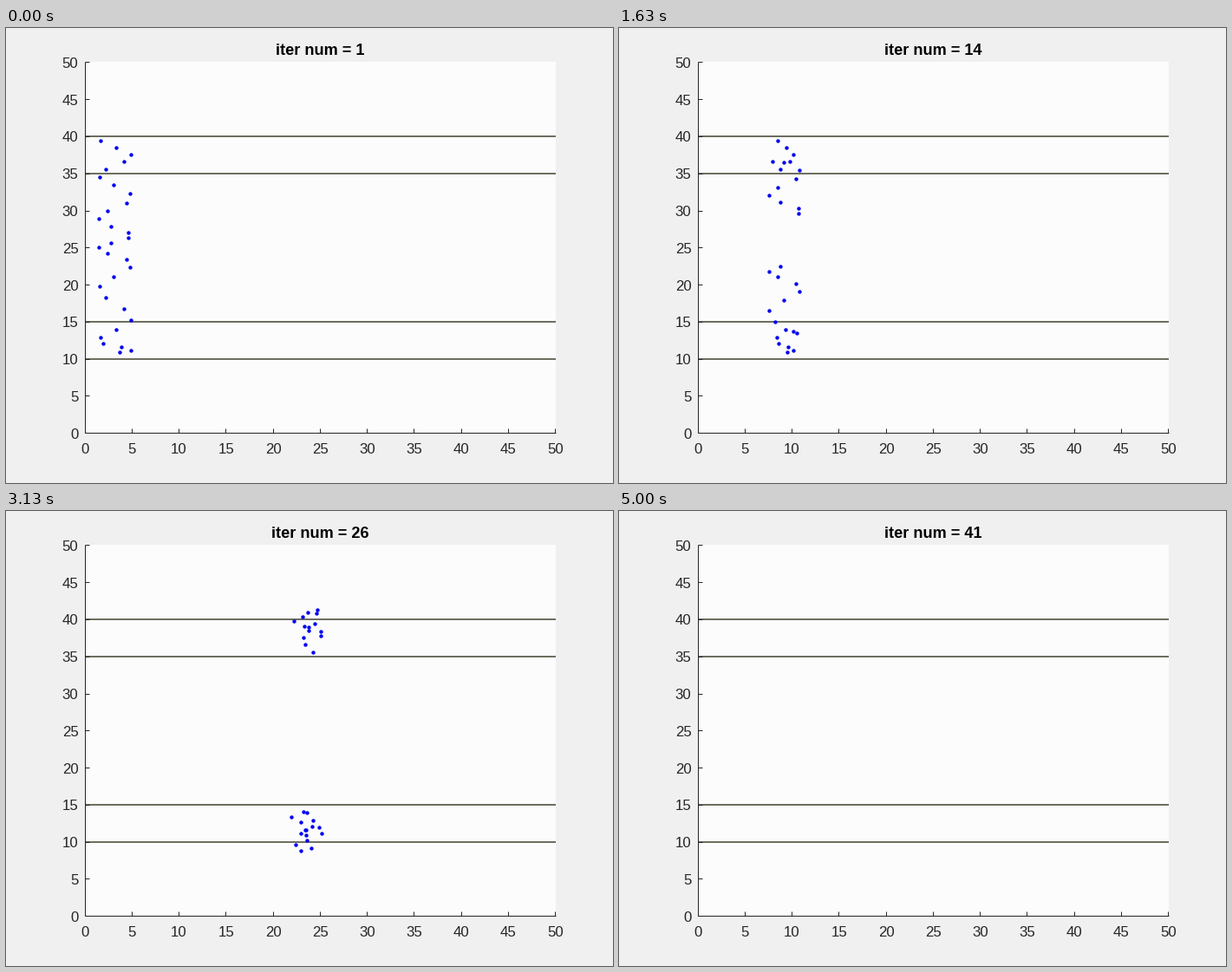
Recreate the animation shown at these times as a matplotlib script. Size 700 by 525 pixels, loop 5.12 s.

```python
import numpy as np
import matplotlib.pyplot as plt
from matplotlib.animation import FuncAnimation
from matplotlib.patches import Rectangle

W, H, DPI = 700, 525, 100
LOOP, TICK, STEP = 5120, 20, 125       # ms
LEFT, RIGHT, TOP, BOTTOM = 91, 633.5, 39.4, 467.25
PT = 72 / DPI                          # points per pixel
INK = "#262626"

COUNT, UPPER = 30, 14                  # walkers, and how many go up
SPEED, THRUST = 0.9, 0.64              # rightward, pixels per step
PUSH, COHESION = 0.31, 0.006

plt.rcParams["font.family"] = "Liberation Sans"


def px(v):
    return LEFT + v * (RIGHT - LEFT) / 50


def py(v):
    return BOTTOM - v * (BOTTOM - TOP) / 50


def starts():
    """Scatter the walkers in a narrow column, from top to bottom."""
    i = np.arange(COUNT)
    x = 125.5 + 18.7 * np.cos(2 * np.pi * (i - 2.2) / 5.15)
    y = 129.5 + 8.6 * i + 0.5 * i * np.cos(2 * np.pi * (i - 24.5) / 15)
    return np.column_stack([x, y])


def simulate(steps):
    """Walkers speed up to the right and are pushed into their corridor;
    inside it they draw together and keep their vertical speed."""
    lower = np.arange(COUNT) >= UPPER
    side = np.where(lower, 1, -1)
    entry = np.where(lower, py(15), py(35))
    width = py(35) - py(40)
    pos = starts()
    depth = side * (pos[:, 1] - entry)
    vel = np.column_stack([np.full(COUNT, SPEED), 0.1 * side * (depth < 0)])
    path = [pos]
    for _ in range(steps - 1):
        depth = side * (pos[:, 1] - entry)
        inside = (depth >= 0) & (depth < width)
        center = np.where(lower, pos[lower, 0].mean(), pos[~lower, 0].mean())
        acc = np.column_stack([
            THRUST + COHESION * inside * (center - pos[:, 0]),
            PUSH * side * (depth < 0)])
        pos = pos + vel + acc / 2
        vel = vel + acc
        path.append(pos)
    return path


path = simulate(LOOP // STEP + 1)

fig = plt.figure(figsize=(W / DPI, H / DPI), dpi=DPI, facecolor="#f0f0f0")
ax = fig.add_axes([0, 0, 1, 1])
ax.set_xlim(0, W)
ax.set_ylim(H, 0)
ax.axis("off")


def line(xs, ys, color=INK, width=1, z=3):
    ax.plot(xs, ys, color=color, lw=width * PT, zorder=z,
            solid_capstyle="butt")


def label(x, y, s, ha, size=16.7, color=INK, **kw):
    return ax.text(x, y, s, ha=ha, va="baseline", fontsize=size * PT,
                   color=color, **kw)


area = Rectangle((LEFT, TOP), RIGHT - LEFT, BOTTOM - TOP,
                 fc="#fcfcfc", ec="none", zorder=1)
ax.add_patch(area)

for level in (10, 15, 35, 40):
    line([LEFT, RIGHT], [py(level)] * 2, "#6e6e60", 2, z=2)

line([LEFT - 0.5] * 2, [TOP, BOTTOM])
line([LEFT - 0.5, RIGHT], [BOTTOM] * 2)
for v in range(0, 51, 5):
    line([px(v) - 0.5] * 2, [BOTTOM, BOTTOM - 5])
    line([LEFT, LEFT + 5], [py(v)] * 2)
    label(px(v), 491, str(v), "center")
    label(83.5, py(v) + 6.5, str(v), "right")

title = label(362.5, 31, "", "center", 18.2, "black", weight="bold")
dots = ax.scatter(*path[0].T, s=(4.4 * PT) ** 2, c="#0000f0", lw=0, zorder=4)
dots.set_clip_path(area)


def update(i):
    n = (i * TICK + TICK // 2) // STEP
    title.set_text(f"iter num = {n + 1}")
    dots.set_offsets(path[n])
    return title, dots


anim = FuncAnimation(fig, update, frames=LOOP // TICK, interval=TICK,
                     repeat=True, repeat_delay=0)
plt.show()
```
